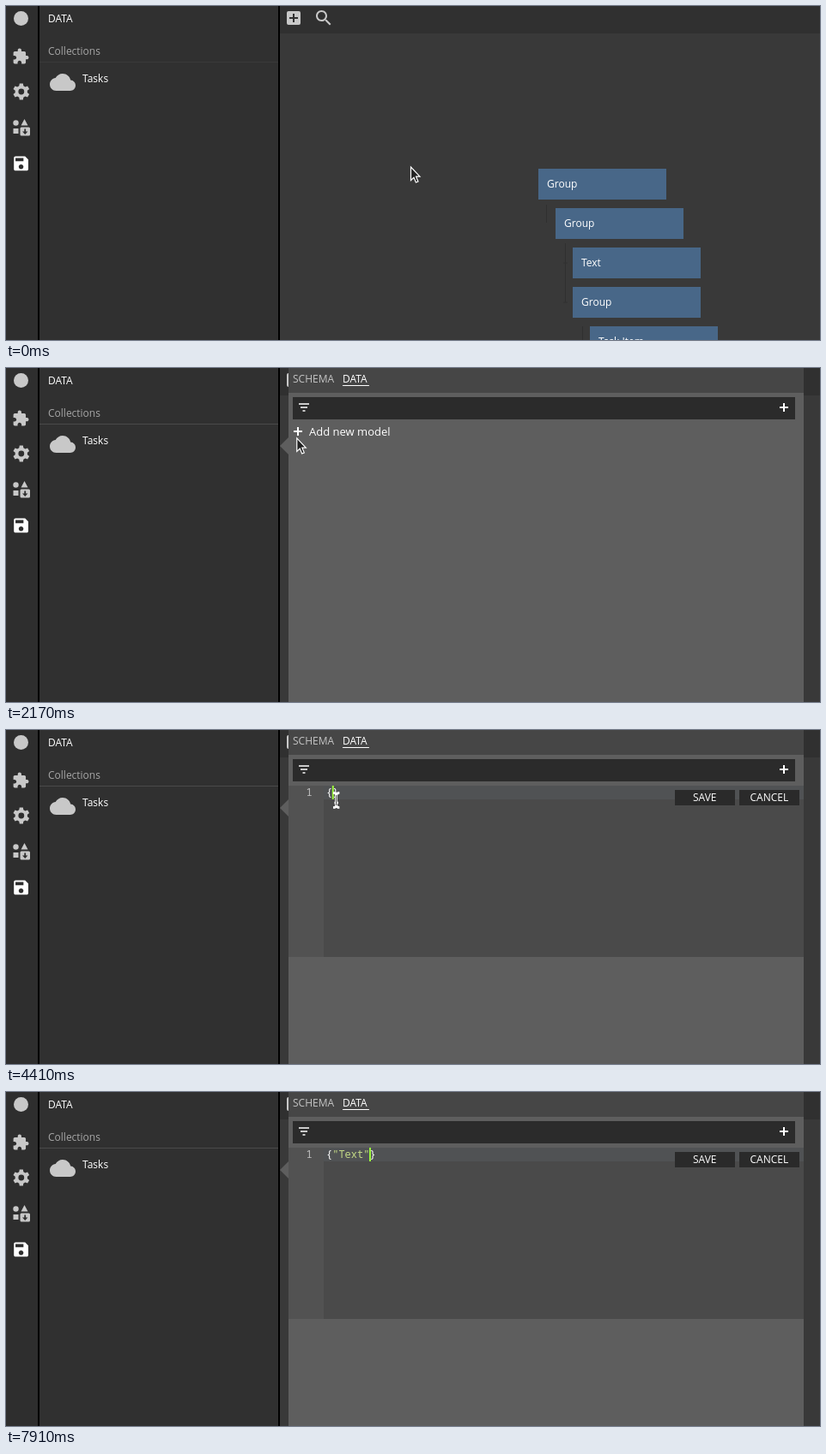
Recreate the animation shown at these times as an HTML page. Size 948 by 390 pixels, loop 8000 ms.

```html
<!DOCTYPE html>
<html lang="en">
<head>
<meta charset="utf-8">
<title>Collections editor</title>
<style>
  html, body { margin: 0; width: 100%; height: 100%; overflow: hidden; background: #393939; }
  svg { display: block; width: 948px; height: 390px; }
  text { font: 12px "Open Sans", sans-serif; fill: #fff; white-space: pre; }
  .strong { font-weight: 500; }
  .muted { fill: #a6a6a6; }
  .code text { font: 12px "Noto Sans Mono", monospace; }
  .icons { fill: #c8c8c8; }
  .line { fill: none; stroke: #fff; stroke-width: 2; }
</style>
</head>
<body>
<svg id="stage" viewBox="0 0 948 390">
  <rect width="948" height="390" fill="#393939"/>
  <rect x="319" width="629" height="32" fill="#303030"/>
  <g class="icons">
    <path fill-rule="evenodd" d="M329 6h12q2 0 2 2v12q0 2-2 2h-12q-2 0-2-2v-12q0-2 2-2zM334 9v4h-4v2h4v4h2v-4h4v-2h-4v-4z"/>
    <path transform="translate(358 2)" d="M15.5 14h-.79l-.28-.27C15.41 12.59 16 11.11 16 9.5 16 5.91 13.09 3 9.5 3S3 5.91 3 9.5 5.91 16 9.5 16c1.61 0 3.09-.59 4.23-1.57l.27.28v.79l5 4.99L20.49 19l-4.99-5zm-6 0C7.01 14 5 11.99 5 9.5S7.01 5 9.5 5 14 7.01 14 9.5 11.99 14 9.5 14z"/>
  </g>
  <path d="M629.5 232V253M651.5 277V346M671.5 374V390M649 300H654M649 346H654" fill="none" stroke="#303030"/>
  <g id="nodes"></g>

  <g id="popup">
    <path d="M329 81V101L319 91Z" fill="#5e5e5e"/>
    <rect x="329" width="600" height="390" fill="#5e5e5e"/>
    <rect x="329" width="600" height="29" fill="#464646"/>
    <text x="334" y="17" fill="#c8c8c8" style="fill:#c4c4c4">SCHEMA</text>
    <text x="392" y="17">DATA</text>
    <rect x="392" y="20" width="31" height="1" fill="#fff"/>
    <rect x="334" y="34" width="585" height="26" fill="#2b2b2b"/>
    <path class="line" style="stroke-width:1.6" d="M341 42H353M343 46H351M345.5 50H348.5"/>
    <path class="line" d="M901 46H911M906 41V51"/>
    <g id="addModel">
      <path d="M335 74H345M340 69V79" fill="none" stroke="currentColor" stroke-width="2"/>
      <text x="353" y="79" style="font-size:13px;fill:currentColor">Add new model</text>
    </g>
    <g id="editor" class="code">
      <rect x="329" y="65" width="600" height="200" fill="#4a4a4a"/>
      <rect x="329" y="65" width="41" height="200" fill="#525252"/>
      <rect x="370" y="65" width="559" height="16" fill="#505254"/>
      <text x="349.5" y="77" style="fill:#c0c0c0">1</text>
      <text x="373" y="77"><tspan>{</tspan><tspan id="string" fill="#c3d986"></tspan><tspan>}</tspan></text>
      <rect id="caret" y="65" width="2" height="16" fill="#9cf53c"/>
      <g id="buttons"></g>
    </g>
  </g>

  <rect width="37" height="390" fill="#2e2e2e"/>
  <rect x="39" width="278" height="390" fill="#303030"/>
  <path d="M38 0V390M318 0V390" stroke="#000" stroke-width="2"/>
  <rect id="rowHover" x="39" y="66" width="278" height="50" fill="#393939"/>
  <rect id="rowLine" x="39" y="65" width="278" height="1"/>
  <text class="strong" x="49" y="19">DATA</text>
  <text class="muted" x="49" y="57">Collections</text>
  <text x="89" y="89">Tasks</text>
  <g class="icons">
    <path transform="translate(51 74) scale(1.25)" d="M19.35 10.04C18.67 6.59 15.64 4 12 4 9.11 4 6.6 5.64 5.35 8.04 2.34 8.36 0 10.91 0 14c0 3.31 2.69 6 6 6h13c2.76 0 5-2.24 5-5 0-2.64-2.05-4.78-4.65-4.96z"/>
    <circle cx="17.5" cy="14.5" r="8.5"/>
    <path transform="translate(6.9 48.7) scale(.85)" d="M20.5 11H19V7c0-1.1-.9-2-2-2h-4V3.5C13 2.12 11.88 1 10.5 1S8 2.12 8 3.5V5H4c-1.1 0-1.99.9-1.99 2v3.8H3.5c1.49 0 2.7 1.21 2.7 2.7s-1.21 2.7-2.7 2.7H2V20c0 1.1.9 2 2 2h3.8v-1.5c0-1.49 1.21-2.7 2.7-2.7 1.49 0 2.7 1.21 2.7 2.7V22H17c1.1 0 2-.9 2-2v-4h1.5c1.38 0 2.5-1.12 2.5-2.5S21.88 11 20.5 11z"/>
    <path id="gear" fill-rule="evenodd"/>
    <circle cx="11.5" cy="136.5" r="3.2"/>
    <path fill-rule="evenodd" d="M21.5 132L25.5 139.5H17.5ZM8.5 143h6v6h-6zM18 141.5h8.5q1.5 0 1.5 1.5v7q0 1.500-1.500 1.500H18q-1.500 0-1.500-1.500v-7q0-1.500 1.500-1.500zM21.300 143.500v3h-2.300l3.200 3.500 3.200-3.500h-2.300v-3z"/>
    <path fill="#fff" transform="translate(6.4 172.8) scale(.93)" d="M17 3H5c-1.11 0-2 .9-2 2v14c0 1.1.89 2 2 2h14c1.1 0 2-.9 2-2V7l-4-4zm-5 16c-1.66 0-3-1.34-3-3s1.34-3 3-3 3 1.34 3 3-1.34 3-3 3zm3-10H5V5h10v4z"/>
  </g>

  <path id="arrow" d="M.5 0V15.500L4 12.200 6.400 18 9 16.900 6.600 11.200H11Z" fill="#222" stroke="#fff" stroke-width="1.2"/>
  <g id="beam" fill="none">
    <path id="beamShape" d="M-3.500-8.500Q0-8.500 0-6V6Q0 8.500-3.500 8.500M3.500-8.500Q0-8.500 0-6V6Q0 8.500 3.500 8.500M-2 3H2" stroke="#fff" stroke-width="2.600"/>
    <use href="#beamShape"/>
    <path d="M0-6V6" stroke="#222" stroke-width=".9"/>
  </g>
</svg>
<script>
const LOOP = 8000, STEP = 70;
const POPUP_AT = 1120, EDITOR_AT = 3360, TYPING_AT = 5390;
const CODE_X = 373, CHAR_W = 7.2;
const el = id => document.getElementById(id);

const arrowMoves = [
  { from: 0, to: 0, x: 471, y: 188 },
  { from: 140, to: 700, x: 165, y: 89 },
  { from: 1680, to: 2380, x: 386, y: 80 },
  { from: 2940, to: 3150, x: 375, y: 76 }
];
const beamMoves = [
  { from: 0, to: 0, x: 375, y: 77 },
  { from: 3780, to: 4060, x: 383, y: 78 },
  { from: 4340, to: 4760, x: 406, y: 133 }
];
// Each edit sets the string and the caret column; "fade" starts a blink-out.
const edits = [
  { at: 3360, text: '', caret: 0 },
  { at: 4060, text: '', caret: 1 },
  { at: 4970, text: '', caret: 1, fade: true },
  { at: 5460, text: '""', caret: 2 },
  { at: 5810, text: '"T"', caret: 3 },
  { at: 6160, text: '"Te"', caret: 4 },
  { at: 6440, text: '"Tex"', caret: 5 },
  { at: 6790, text: '"Text"', caret: 6 },
  { at: 7280, text: '"Text"', caret: 6, fade: true },
  { at: 7700, text: '"Text"', caret: 7 }
];

const box = (x, y, w, h, fill, label, dx, dy) =>
  `<rect x="${x}" y="${y}" width="${w}" height="${h}" fill="${fill}"/>` +
  `<text x="${x + dx}" y="${y + dy}" style="font-family:'Open Sans',sans-serif">${label}</text>`;

el('nodes').innerHTML = [['Group', 620], ['Group', 640], ['Text', 660], ['Group', 660], ['Task Item', 680]]
  .map(([label, x], i) => box(x, 190 + 46 * i, 149, 36, '#486788', label, 10, 22)).join('');
el('buttons').innerHTML =
  box(779, 70, 70, 18, '#2a2a2a', 'SAVE', 21, 13) + box(854, 70, 70, 18, '#2a2a2a', 'CANCEL', 12.5, 13);

function gearPath(cx, cy, teeth) {
  const points = [];
  for (let i = 0; i < teeth; i++) {
    for (const [offset, r] of [[-.34, 7.2], [-.2, 9.8], [.2, 9.8], [.34, 7.2]]) {
      const a = (i + offset) / teeth * 2 * Math.PI;
      points.push(`${cx + r * Math.sin(a)} ${cy - r * Math.cos(a)}`);
    }
  }
  return `M${points.join('L')}Z M${cx - 3.4} ${cy}a3.4 3.4 0 1 0 6.8 0a3.4 3.4 0 1 0 -6.8 0Z`;
}
el('gear').setAttribute('d', gearPath(17.8, 100, 6));

const clamp = v => Math.min(1, Math.max(0, v));
const ease = v => v * v * (3 - 2 * v);

function positionAt(moves, t) {
  let { x, y } = moves[0];
  for (const move of moves.slice(1)) {
    const p = ease(clamp((t - move.from) / (move.to - move.from)));
    x += (move.x - x) * p;
    y += (move.y - y) * p;
  }
  return { x, y };
}

const show = (id, visible) => el(id).setAttribute('visibility', visible ? 'inherit' : 'hidden');
const place = (id, { x, y }) => el(id).setAttribute('transform', `translate(${x} ${y})`);

function render(time) {
  const t = Math.floor((time % LOOP) / STEP) * STEP;
  const open = t >= POPUP_AT, editing = t >= EDITOR_AT;
  const arrow = positionAt(arrowMoves, t);
  const overRow = arrow.x < 317 && arrow.y > 66 && arrow.y < 116;

  place('arrow', arrow);
  place('beam', positionAt(beamMoves, t));
  show('arrow', !editing);
  show('beam', editing && t < TYPING_AT);
  show('popup', open);
  show('editor', open && editing);
  show('addModel', open && !editing);
  show('rowHover', overRow);
  el('rowLine').setAttribute('fill', open ? '#4a4a4a' : '#393939');
  el('addModel').style.color = arrow.x > 334 && arrow.x < 450 && arrow.y > 64 && open ? '#fff' : '#c6c6c6';

  const edit = edits.filter(e => e.at <= t).pop() || edits[0];
  el('string').textContent = edit.text;
  el('caret').setAttribute('x', CODE_X + CHAR_W * edit.caret - .4);
  el('caret').setAttribute('opacity', edit.fade ? 1 - clamp((t - edit.at + STEP) / (3 * STEP)) : 1);
}

const start = performance.now();
function tick() {
  render(performance.now() - start);
  requestAnimationFrame(tick);
}
tick();
</script>
</body>
</html>
```
